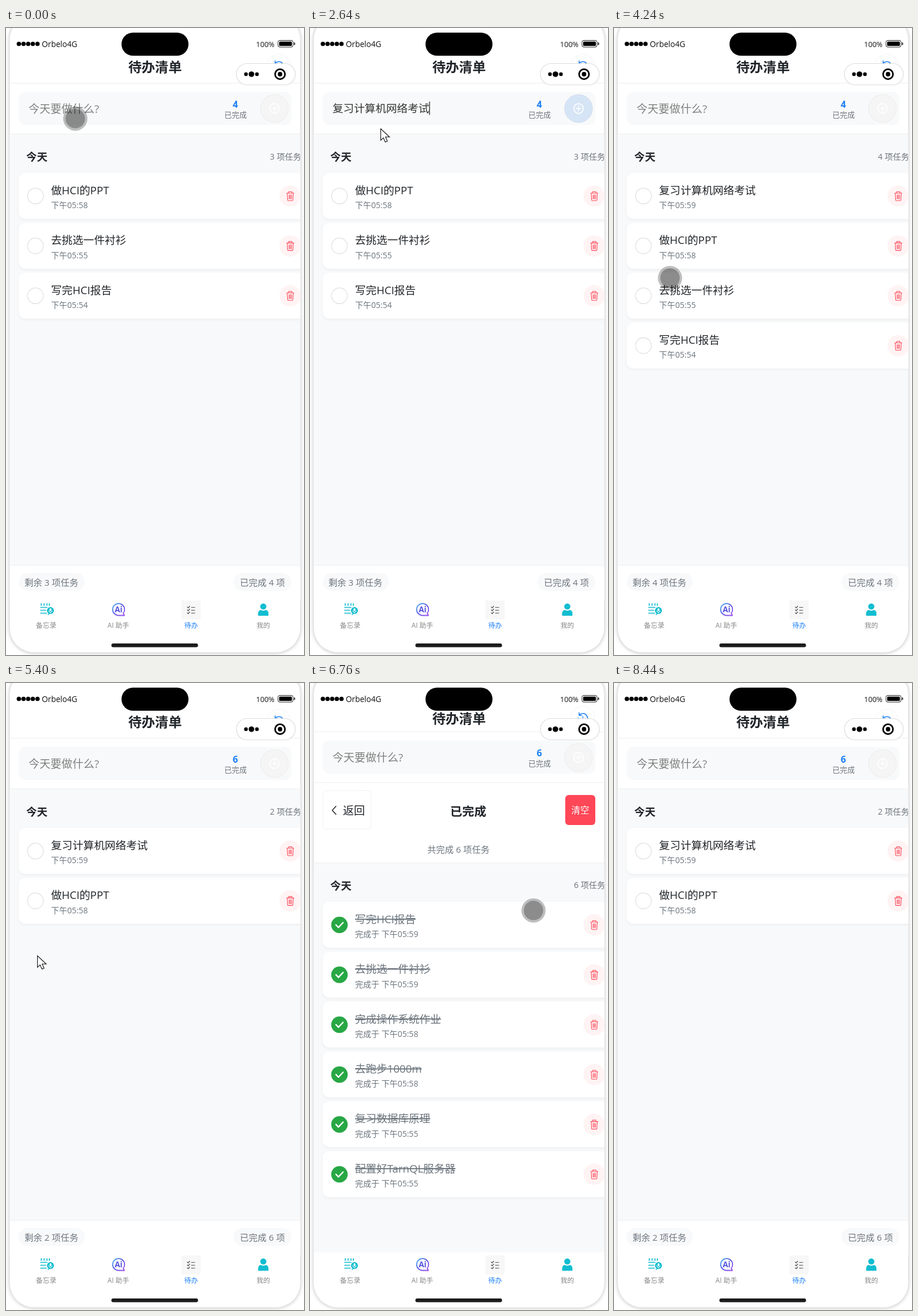
An HTML page for the animation above (9360 ms loop, 516x1086 px).

```html
<!DOCTYPE html>
<html lang="zh-CN">
<head>
<meta charset="utf-8">
<title>待办清单</title>
<style>
html, body { margin: 0; width: 100%; height: 100%; overflow: hidden; background: #fff; }
svg { display: block; width: 516px; height: 1086px; }
text { font-family: "Open Sans", "Noto Sans CJK SC", "Noto Sans CJK", "Noto Sans", sans-serif; white-space: pre; }
</style>
</head>
<body>
<svg viewBox="0 0 516 1086" xmlns="http://www.w3.org/2000/svg">
  <defs>
    <clipPath id="screen"><rect x="6.5" y="-22" width="503" height="1103.5" rx="42"/></clipPath>
    <filter id="soft" x="-10%" y="-10%" width="120%" height="130%"><feGaussianBlur stdDeviation="3.5"/></filter>
    <filter id="cardShade" x="-5%" y="-20%" width="110%" height="150%"><feDropShadow dx="0" dy="2" stdDeviation="2" flood-opacity=".045"/></filter>
    <filter id="popShade" x="-10%" y="-50%" width="120%" height="220%"><feDropShadow dx="0" dy="4" stdDeviation="4" flood-opacity=".24"/></filter>
    <linearGradient id="violet" x2="1" y2="1"><stop stop-color="#45b8f5"/><stop offset=".5" stop-color="#5a55e8"/><stop offset="1" stop-color="#a04ff0"/></linearGradient>
  </defs>
  <rect x="6.5" y="-22" width="503" height="1104" rx="42" filter="url(#soft)" fill="#000" opacity=".28"/>
  <g clip-path="url(#screen)">
    <rect width="516" height="1086" fill="#fff"/>
    <g id="page"></g>
    <g id="input"></g>
    <g id="chrome"></g>
  </g>
  <g id="popup"></g>
  <g id="cursor"></g>
</svg>
<script>
const LOOP = 9360, STEP = 40;
const $ = id => document.getElementById(id);

// y is the vertical middle of the line
const text = (s, x, y, size, fill, extra = '') =>
  `<text x="${x}" y="${y + size * .37}" font-size="${size}" fill="${fill}" ${extra}>${s}</text>`;
const rect = (x, y, w, h, fill, r = 0, extra = '') =>
  `<rect x="${x}" y="${y}" width="${w}" height="${h}" rx="${r}" fill="${fill}" ${extra}/>`;
const circle = (x, y, r, fill, extra = '') =>
  `<circle cx="${x}" cy="${y}" r="${r}" fill="${fill}" ${extra}/>`;
const line = (d, color, w = 1.5, extra = '') =>
  `<path d="${d}" fill="none" stroke="${color}" stroke-width="${w}" stroke-linecap="round" stroke-linejoin="round" ${extra}/>`;
const MID = 'text-anchor="middle"', BOLD = 'font-weight="700"', MB = MID + ' ' + BOLD;
const INK = '#212529', GRAY = '#6c757d', BLUE = '#1a7ff5', RED = '#ff4757', TEAL = '#12bdd0', PALE = '#f8f9fa';

const tasks = [
  ['复习计算机网络考试', '05:59'], ['做HCI的PPT', '05:58'],
  ['去挑选一件衬衫', '05:55'], ['写完HCI报告', '05:54']
];
const finished = [
  ['写完HCI报告', '05:59'], ['去挑选一件衬衫', '05:59'], ['完成操作系统作业', '05:58'],
  ['去跑步1000m', '05:58'], ['复习数据库原理', '05:55'], ['配置好TarnQL服务器', '05:55']
];

// time, rows shown, finished count, finished page open
const states = [
  [0, [1, 2, 3], 4], [3320, [0, 1, 2, 3], 4], [4880, [0, 1, 3], 5],
  [5240, [0, 1], 6], [6440, [0, 1], 6, true], [7960, [0, 1], 6]
];

// time, letters, first candidate
const typing = [
  [680, 'f', '发'], [760, 'fu', '复'], [840, "fu'x", '复习'], [920, "fu'xi", '复习'],
  [1000, "fu'xi'j", '复习就'], [1080, "fu'xi'ji", '复习机'], [1160, "fu'xi'ji's", '复习及时'],
  [1240, "fu'xi'ji'su", '复习急速'], [1320, "fu'xi'ji'suan", '复习计算'],
  [1400, "fu'xi'ji'suan'j", '复习计算机'], [1480, "fu'xi'ji'suan'ji", '复习计算机'],
  [1560, "fu'xi'ji'suan'ji'w", '复习计算机我'], [1640, "fu'xi'ji'suan'ji'wa", '复习计算机哇'],
  [1680, "fu'xi'ji'suan'ji'wan", '复习计算机玩'], [1800, "fu'xi'ji'suan'ji'wang", '复习计算机网'],
  [1880, "fu'xi'ji'suan'ji'wang'l", '复习计算机网络'], [1960, "fu'xi'ji'suan'ji'wang'lu", '复习计算机网路'],
  [2080, "fu'xi'ji'suan'ji'wang'luo", '复习计算机网络'],
  [2320, "fu'xi'ji'suan'ji'wang'luo'k", '复习计算机网络课'],
  [2400, "fu'xi'ji'suan'ji'wang'luo'kao", '复习计算机网络考'],
  [2480, "fu'xi'ji'suan'ji'wang'luo'kao's", '复习计算机网络考试'],
  [2560, "fu'xi'ji'suan'ji'wang'luo'kao'shi", '复习计算机网络考试']
];
const FOCUS = 120, COMMIT = 2640, SENT = 3320;

// time, x, y, arrow instead of touch dot
const path = [
  [0, 120, 157], [200, 129, 165], [240, 122, 174, 1], [2640, 122, 174, 1],
  [2680, 128, 190], [2760, 160, 218], [3000, 400, 198], [3160, 476, 152], [3200, 480, 147],
  [3440, 480, 147], [3680, 380, 225], [4000, 170, 375], [4240, 97, 433], [4400, 52, 390],
  [4600, 52, 390], [4760, 51, 464], [5200, 52, 468], [5240, 54, 472, 1], [5400, 54, 472, 1],
  [5440, 72, 510], [5520, 165, 632], [5600, 195, 663], [5760, 325, 520], [6000, 441, 260],
  [6160, 405, 142], [6240, 397, 135], [6440, 397, 135], [6600, 392, 270], [6760, 387, 394],
  [6800, 387, 394], [7080, 375, 520], [7360, 270, 410], [7720, 70, 226], [7960, 64, 222],
  [8280, 370, 451], [8320, 365, 570], [8360, 350, 820], [8400, 331, 1021], [8440, 0, 0]
];

const lastAt = (table, t) => table.filter(row => row[0] <= t).pop();

function trash(y) {
  return circle(492, y, 18.5, '#fff3f4') +
    line(`M486 ${y - 5}h12.5M489.500 ${y - 5}v-2.500h5.500v2.500M487 ${y - 5}l.6 12q.1 1 1 1h7.200q.9 0 1-1l.6-12M490.300 ${y - 2}v7M492.300 ${y - 2}v7M494.300 ${y - 2}v7`, RED, 1.1);
}

function card([title, time], y, done) {
  const mark = done
    ? circle(51, y, 14.3, '#28a745') + line(`M45 ${y}l4.200 4.500 8-8.500`, '#fff', 2.4)
    : circle(51, y, 13.7, '#fff', 'stroke="#dfe2e5" stroke-width="1.3"');
  return rect(22, y - 40, 510, 79.5, '#fff', 12, 'filter="url(#cardShade)"') + mark +
    text(title, 78, y - 10, 18.6, done ? GRAY : INK, done ? 'text-decoration="line-through"' : '') +
    text((done ? '完成于 ' : '') + '下午' + time, 78, y + 16, 14, GRAY) + trash(y);
}

const heading = (y, n) => text('今天', 35, y, 18.4, INK, BOLD) + text(n + ' 项任务', 457, y - 1, 14.1, GRAY);
const rule = y => rect(6, y, 504, 1, '#eceef0');

function header(up, done) {
  const y = 66 - up / 2;
  return circle(472.5, y, 20.5, '#fff', 'stroke="#f3f4f5"') +
    line(`M466.500 ${y - 5}a8 8 0 1 1 -2 5M466 ${y - 9}v4.500h4.500`, BLUE, 1.6) +
    line(`M472.500 ${y - 3}v4h3`, BLUE, 1.2) +
    text('待办清单', 258, y + 1, 23.2, INK, MB) + rule(95 - up) +
    rect(22, 110.5 - up, 472, 57.5, PALE, 11) +
    text(done, 397, 132 - up, 16, BLUE, MB) + text('已完成', 397.5, 150 - up, 13, GRAY, MID) +
    rule(183 - up);
}

function todoPage(rows, done) {
  return rect(6, 184, 504, 747, PALE) + header(0, done) + heading(223.5, rows.length) +
    rows.map((id, i) => card(tasks[id], 291 + i * 86.4)).join('') +
    rect(6, 931, 504, 60, '#fff') + rule(930) +
    rect(22, 944, 114.5, 31, PALE, 15.5) + text(`剩余 ${rows.length} 项任务`, 32, 960, 15.3, GRAY) +
    rect(394, 944, 100, 31, PALE, 15.5) + text(`已完成 ${done} 项`, 444, 960, 15.3, GRAY, MID);
}

function donePage(done) {
  return rect(6, 312, 504, 675, PALE) + header(11, done) +
    rect(22.5, 186.5, 83, 66.5, '#fff', 5, 'stroke="#eef0f1"') +
    line('M45 213.500l-6.500 7 6.500 7', INK, 1.5) + text('返回', 57, 221, 19, INK) +
    text('已完成', 274, 222, 20.8, INK, MB) +
    rect(442, 194, 52, 52, RED, 6) + text('清空', 468, 220, 15.5, '#fff', MID) +
    text(`共完成 ${done} 项任务`, 257, 288, 15.2, GRAY, MID) + rule(311) +
    heading(351, done) + finished.map((f, i) => card(f, 419 + i * 86.4, true)).join('') +
    rect(6, 986, 504, 100, '#fff');
}

function chrome() {
  let s = '';
  for (let i = 0; i < 5; i++) s += circle(22.3 + i * 7.9 * 1.02, 27.5, 3.8, '#000');
  s += text('Orbelo4G', 62, 27.5, 13.6, '#111') + rect(200, 8, 116, 40, '#000', 20) +
    text('100%', 433, 28, 12.6, '#111') +
    rect(471, 21.5, 26, 11.5, 'none', 3, 'stroke="#222"') + rect(473, 23.5, 22, 7.5, '#000', 1.5) +
    rect(498.500, 25, 2, 4.5, '#222', 1);
  s += rect(399, 61.5, 102, 37, '#fff', 18.5, 'stroke="#dcdcdc" stroke-width="1.2"') +
    circle(415.5, 80, 3.2, '#000') + circle(425, 80, 4.8, '#000') + circle(434.5, 80, 3.2, '#000') +
    circle(474.5, 80, 8.6, 'none', 'stroke="#000" stroke-width="2.8"') + circle(474.5, 80, 3.9, '#000');
  // tab icons
  s += line('M61 997v3M66 997v3M71 997v3M75 997v3', TEAL, 1.7) +
    line('M60 1003.500h11M60 1008.500h9M60 1013.500h10', TEAL, 1.7) +
    circle(77, 1009, 6, TEAL) + rect(75.500, 1005, 3, 5, '#fff', 1.5) +
    line('M74 1009q0 3 3 3t3-3M77 1012v1.500', '#fff', .9) + line('M73 1016l2-2', TEAL, 1.6);
  s += line('M205 1017.500h-10a10.300 10.300 0 1 1 10.300-10.300q0 4-2.300 6.500z', 'url(#violet)', 1.8) +
    text('Ai', 195, 1007, 13.5, '#5653dc', MB);
  s += rect(304, 991.500, 33, 33, '#f7f7f8', 2) +
    line('M314 1003l1.500 1.500 2.500-3M314 1008l1.500 1.500 2.500-3M314 1013l1.500 1.500 2.500-3M321 1003.500h6M321 1008.500h6M321 1013.500h6', '#555', 1.2);
  s += circle(445.5, 1002, 5.3, TEAL) + `<path d="M436.500 1018v-3.500q0-6 5-6.500 4 2.500 8 0 5 .5 5 6.500v3.500z" fill="${TEAL}"/>`;
  [['备忘录', 69.5], ['AI 助手', 194.5], ['待办', 320.5], ['我的', 445.5]].forEach(([name, x], i) =>
    s += text(name, x, 1035, 11.8, i === 2 ? BLUE : '#888', MID));
  return s + rect(182.5, 1066, 150, 6.5, '#1c1c1c', 3.2);
}

function inputBox(t, open) {
  const y = open ? 129 : 139.5;
  const fade = (from, to) => Math.max(0, Math.min(1, (t - from) / (to - from)));
  const lit = fade(COMMIT - 40, COMMIT + 240) * (1 - fade(3360, 3640));
  let s = circle(465, y, 24.2, '#f5f5f5', 'stroke="#ececec"') +
    circle(465, y, 24.5, BLUE, `opacity="${lit}"`) +
    circle(465, y, 8.3, 'none', 'stroke="#fff" stroke-width="1.7"') +
    line(`M460.500 ${y}h9M465 ${y - 4.5}v9`, '#fff', 1.6);
  const word = t < 680 || t >= SENT ? '' : t >= COMMIT ? tasks[0][0] : lastAt(typing, t)[1];
  s += word ? text(word, 39, y, word === tasks[0][0] ? 18.6 : 19, '#333', 'id="word"')
            : text('今天要做什么?', 39, y, 19, '#808080');
  $('input').innerHTML = s;
  if (t < FOCUS || t >= SENT) return;
  const w = word ? $('word').getComputedTextLength() : 0;
  const under = word && t < COMMIT ? rect(39, 150, w, 1, '#444') : '';
  $('input').innerHTML += under + rect(39 + w, 127.5, 1.2, 23, '#111');
}

function popup(t) {
  if (t < 680 || t >= COMMIT) return '';
  const first = lastAt(typing, t)[2], left = t >= 2320 ? 14 : 40;
  const width = first.length * 18.5;
  let x = left + 22;
  let s = rect(left + .5, 155.5, 560, 46.5, '#f9f9f9', 8, 'stroke="#cfcfcf" filter="url(#popShade)"') +
    rect(left + 8, 161, width + 40, 34, '#eee', 5) + rect(left + 6.500, 168, 4, 21, '#0067c0', 2);
  [first, '复习', '伏羲', '父系', '付息'].forEach((c, i) => {
    s += text(i + 1, x, 179, 18.5, '#555') + text(c, x + 15.5, 179, 18.5, '#1f1f1f');
    x += c.length * 18.5 + (i ? 49.5 : 46);
  });
  return s;
}

function cursor(t) {
  if (t >= 8440) return '';
  const a = lastAt(path, t), b = path[path.indexOf(a) + 1];
  const k = a[3] !== b[3] ? 0 : (t - a[0]) / (b[0] - a[0]);
  const x = a[1] + (b[1] - a[1]) * k, y = a[2] + (b[2] - a[2]) * k;
  if (a[3]) return `<path transform="translate(${x} ${y})" d="M.5 .5v20l4.500-4.300 3.300 7.300 3.700-1.600-3.300-7.100h7z" fill="#fff" stroke="#111" stroke-width="1.100"/>`;
  return circle(x, y, 21, '#000', 'opacity=".25"') + circle(x, y, 16.8, '#000', 'opacity=".27"');
}

let shown;
function render(t) {
  const state = lastAt(states, t), [, rows, done, open] = state;
  if (state !== shown) {
    $('page').innerHTML = open ? donePage(done) : todoPage(rows, done);
    shown = state;
  }
  inputBox(t, open);
  $('popup').innerHTML = popup(t);
  $('cursor').innerHTML = cursor(t);
}

$('chrome').innerHTML = chrome();
const start = performance.now();
let last = -1;
function tick() {
  const t = Math.floor(((performance.now() - start) % LOOP) / STEP) * STEP;
  if (t !== last) render(last = t);
  requestAnimationFrame(tick);
}
tick();
</script>
</body>
</html>
```
